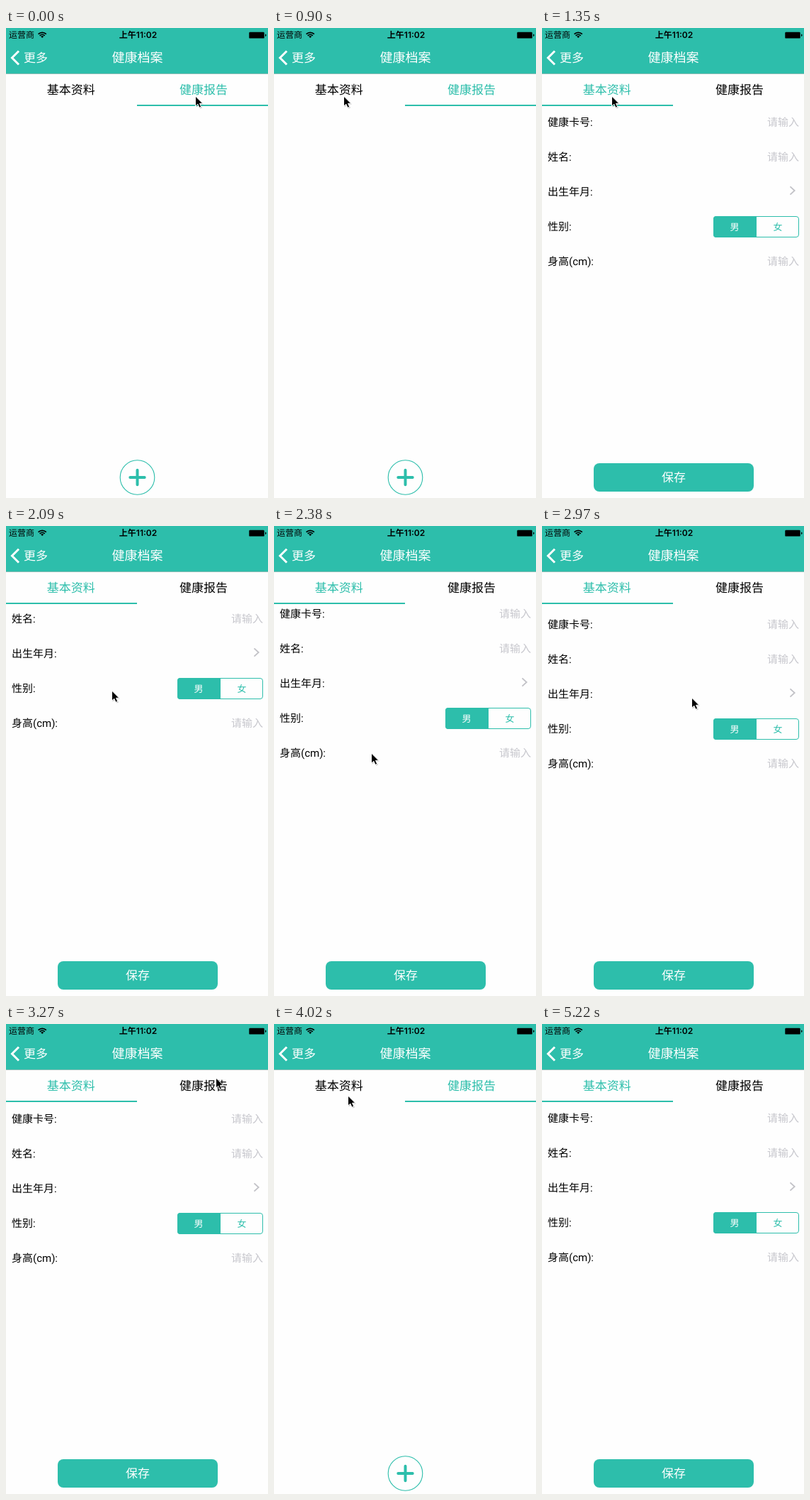
An HTML page that plays this animation: 370 px wide and 662 px high, repeating every 5510 ms.

```html
<!DOCTYPE html>
<html lang="zh-CN">
<head>
<meta charset="utf-8">
<title>健康档案</title>
<style>
  html, body { margin: 0; width: 100%; height: 100%; overflow: hidden; background: #fefefe; }
  svg { display: block; width: 370px; height: 662px; }
  text { font-family: Inter, "Noto Sans CJK SC", "Noto Sans CJK", sans-serif; text-rendering: geometricPrecision; }
  #rows text { font-family: Roboto, "Noto Sans CJK SC", "Noto Sans CJK", sans-serif; }
  .teal { fill: #2dbeab; }
  .line { fill: none; stroke: #2dbeab; }
  .white { fill: #fff; }
  text.light { font-family: "Noto Sans CJK SC Light", "Noto Sans CJK SC", "Noto Sans CJK", sans-serif; font-weight: 300; }
  .mid { text-anchor: middle; }
  .end { text-anchor: end; }
  .hint { fill: #c7c7cd; }
</style>
</head>
<body>
<svg viewBox="0 0 370 662">
  <defs>
    <clipPath id="listArea"><rect y="110" width="370" height="552"/></clipPath>
  </defs>
  <rect width="370" height="662" fill="#fefefe"/>

  <g id="form">
    <g clip-path="url(#listArea)"><g id="rows" font-size="15"></g></g>
    <rect class="teal" x="73" y="613" width="226" height="40" rx="8"/>
    <text class="white light mid" x="186" y="639.3" font-size="17">保存</text>
  </g>

  <g id="report" class="line">
    <circle cx="185.5" cy="633" r="24.3" stroke-width="1.1"/>
    <path d="M175.3 633H195.7M185.5 622.8V643.2" stroke-width="4" stroke-linecap="round"/>
  </g>

  <rect class="teal" width="370" height="64"/>
  <rect y="64" width="370" height="1" fill="#8dbdb5"/>
  <text x="4" y="14.4" font-size="12">运营商</text>
  <g fill="none" stroke="#000" stroke-width="1.8">
    <path d="M45.6 8.6A8 8 0 0 1 56.8 8.6M47.7 10.8A5 5 0 0 1 54.7 10.8"/>
    <path d="M51.2 14L49.2 12A2.9 2.9 0 0 1 53.2 12Z" fill="#000" stroke="none"/>
  </g>
  <text class="mid" x="186.5" y="14.4" font-size="12" font-weight="600">上午11:02</text>
  <rect x="343.3" y="5.8" width="21.4" height="8.8" rx="1.2"/>
  <path d="M366 8.4Q367.6 8.6 367.6 10.1T366 11.9Z"/>

  <path d="M18 32.5L8.5 42L18 51.5" fill="none" stroke="#fff" stroke-width="3"/>
  <text class="white light" x="25" y="48.2" font-size="17">更多</text>
  <text class="white light mid" x="185.5" y="48.4" font-size="18">健康档案</text>

  <g class="mid" font-size="17">
    <text id="tabForm" x="91.7" y="93.2">基本资料</text>
    <text id="tabReport" x="279" y="93.2">健康报告</text>
  </g>
  <rect id="underline" class="teal" y="108" width="185" height="2"/>

  <g id="cursor">
    <path d="M1.5 1V15.5L5 12.5L7.3 17.5L10 16.5L7.8 11.5H12Z" opacity=".2"/>
    <path d="M.5 0V14.1L3.8 11.2L6 16.3L8.7 15.1L6.5 10.3H10.8Z" stroke="#fff"/>
  </g>
</svg>
<script>
  const LOOP = 5510, TICK = 148.5;
  const FIRST_ROW = 132, ROW_PITCH = 49;
  const el = id => document.getElementById(id);

  const hint = '<text class="hint light end" x="363" y="5.5">请输入</text>';
  const chevron = '<path d="M350.5 -6.7L356.7 -1L350.5 4.7" fill="none" stroke="#c2c2c7" stroke-width="1.8"/>';
  const gender = `
    <rect class="line" x="242.5" y="-13.5" width="120" height="29" rx="3.5"/>
    <path class="teal" d="M303 -14H246Q242 -14 242 -10V12Q242 16 246 16H303Z"/>
    <g class="mid" font-size="13">
      <text class="white" x="272" y="5.7">男</text>
      <text class="teal" x="333" y="5.7">女</text>
    </g>`;
  const fields = [
    ['健康卡号:', hint], ['姓名:', hint], ['出生年月:', chevron],
    ['性别:', gender], ['身高(cm):', hint]
  ];
  el('rows').innerHTML = fields.map(([label, control], i) =>
    `<g transform="translate(0 ${FIRST_ROW + i * ROW_PITCH})"><text x="8" y="5.9">${label}</text>${control}</g>`
  ).join('');

  // The screen refreshes once per tick; all moves are timed in ticks.
  const start = { x: 267, y: 96 };
  const grab = { from: 10, to: 12, x: 145, y: 338 };
  const pullDown = { from: 14, to: 18, x: 125, y: 408 };
  const moves = [
    { from: 2, to: 6, x: 98, y: 96 },
    grab,
    { from: 12, to: 14, x: 149, y: 232 },
    pullDown,
    { from: 18, to: 22, x: 296, y: 76 },
    { from: 25, to: 27, x: 104, y: 101 },
    { from: 29, to: 31, x: 334, y: 670 }
  ];

  function ease(tick, from, to) {
    const p = Math.min(1, Math.max(0, (tick - from) / (to - from)));
    return p * p * (3 - 2 * p);
  }

  function pointer(tick) {
    return moves.reduce((pos, move) => {
      const p = ease(tick, move.from, move.to);
      return { x: pos.x + (move.x - pos.x) * p, y: pos.y + (move.y - pos.y) * p };
    }, start);
  }

  // The list follows the drag with resistance, then springs back.
  function scrollOffset(tick) {
    if (tick < grab.to) return 0;
    const dragged = pointer(Math.min(tick, pullDown.to)).y - grab.y;
    const decay = Math.exp(-0.88 * Math.max(0, tick - pullDown.to));
    return Math.round(dragged * 0.483 * decay);
  }

  function draw(time) {
    const tick = Math.floor(time / TICK);
    const onForm = tick >= 9 && tick < 23 || tick >= 29;
    const { x, y } = pointer(tick);
    el('form').style.display = onForm ? '' : 'none';
    el('report').style.display = onForm ? 'none' : '';
    el('tabForm').style.fill = onForm ? '#2dbeab' : '#000';
    el('tabReport').style.fill = onForm ? '#000' : '#2dbeab';
    el('underline').setAttribute('x', onForm ? 0 : 185);
    el('rows').setAttribute('transform', `translate(0 ${scrollOffset(tick)})`);
    el('cursor').setAttribute('transform', `translate(${Math.round(x)} ${Math.round(y)})`);
  }

  function animate() {
    draw(performance.now() % LOOP);
    requestAnimationFrame(animate);
  }
  animate();
</script>
</body>
</html>
```
